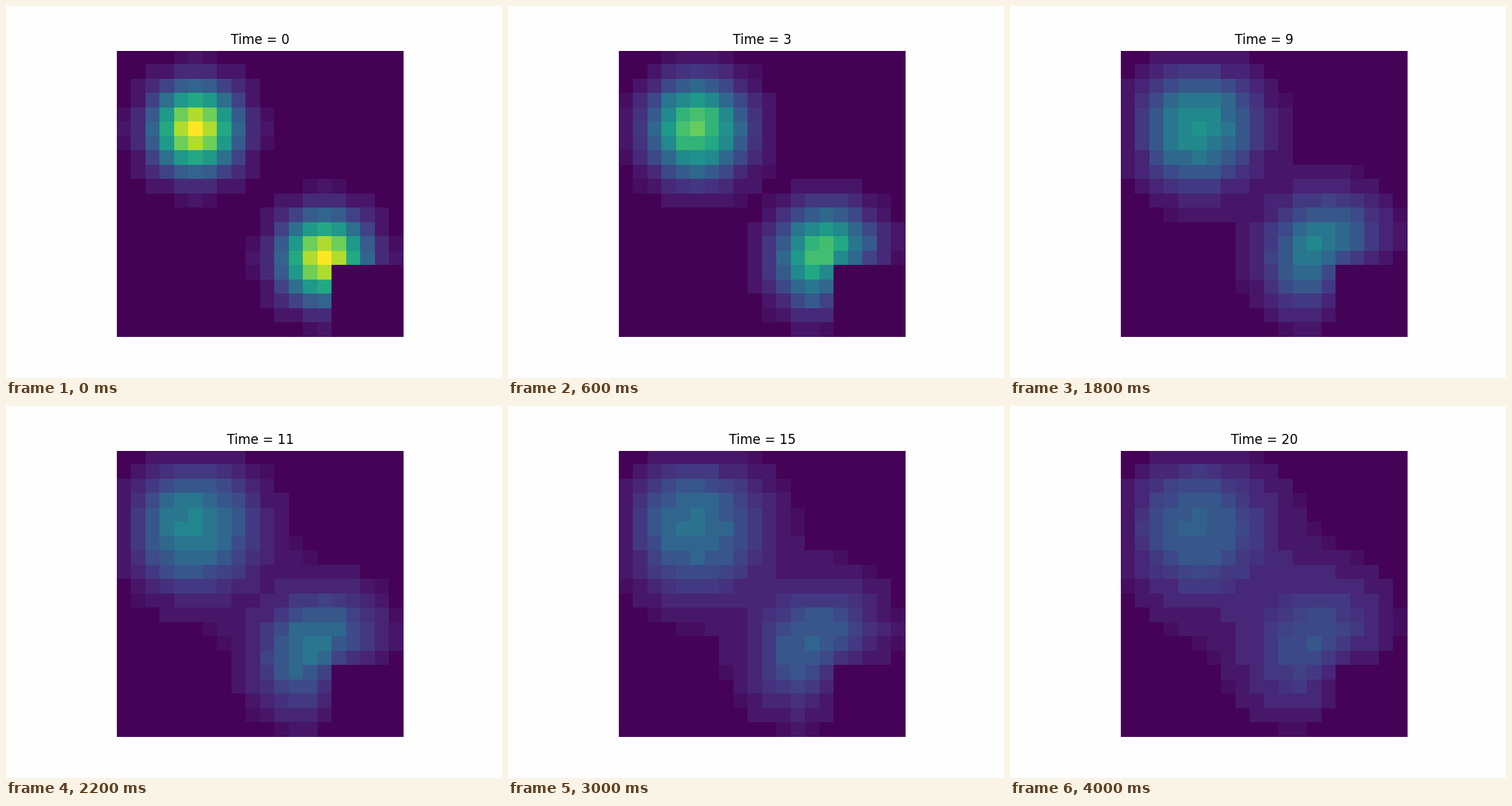
Animation of 640x480 px, one loop 4200 ms. Source, as a matplotlib script:

```python
import numpy as np
import matplotlib.pyplot as plt
from matplotlib.animation import FuncAnimation

SIZE = 20
STEPS = 21
RATE = 0.15
HOLE = 15            # cells from here on, in both axes, stay empty
CENTERS = (5, 14)


def initial_field():
    rows, cols = np.mgrid[:SIZE, :SIZE]
    field = sum(np.exp(-((rows - c) ** 2 + (cols - c) ** 2) / 8) for c in CENTERS)
    field[HOLE:, HOLE:] = 0
    return field


def diffuse(field):
    """One in-place sweep: cells above and to the left are already updated."""
    u = np.pad(field, 1)
    for i in range(1, SIZE + 1):
        for j in range(1, SIZE + 1):
            if i > HOLE and j > HOLE:
                continue
            around = u[i - 1, j] + u[i + 1, j] + u[i, j - 1] + u[i, j + 1]
            u[i, j] += RATE * (around - 4 * u[i, j])
    return u[1:-1, 1:-1]


def banded_colors(field):
    """Viridis colors, averaged inside coarse RGB buckets to give flat bands."""
    rgb = plt.cm.viridis(np.clip(field, 0, 1), bytes=True)[..., :3].astype(int)
    bucket = (rgb[..., 0] >> 5) * 128 + (rgb[..., 1] >> 4) * 8 + (rgb[..., 2] >> 5)
    for key in np.unique(bucket):
        inside = bucket == key
        rgb[inside] = rgb[inside].mean(axis=0).astype(int)
    return rgb.astype(np.uint8)


fields = [initial_field()]
while len(fields) < STEPS:
    fields.append(diffuse(fields[-1]))
images = [banded_colors(field) for field in fields]

fig, ax = plt.subplots(figsize=(6.4, 4.8), dpi=100, facecolor="#fefefe")
ax.axis("off")
picture = ax.imshow(images[0], interpolation="nearest")
title = ax.set_title("Time = 0", fontsize=12, fontname="DejaVu Sans")


def update(step):
    picture.set_data(images[step])
    title.set_text(f"Time = {step}")
    return picture, title


anim = FuncAnimation(fig, update, frames=STEPS, interval=200, repeat=True,
                     repeat_delay=0, blit=False)
plt.show()
```
